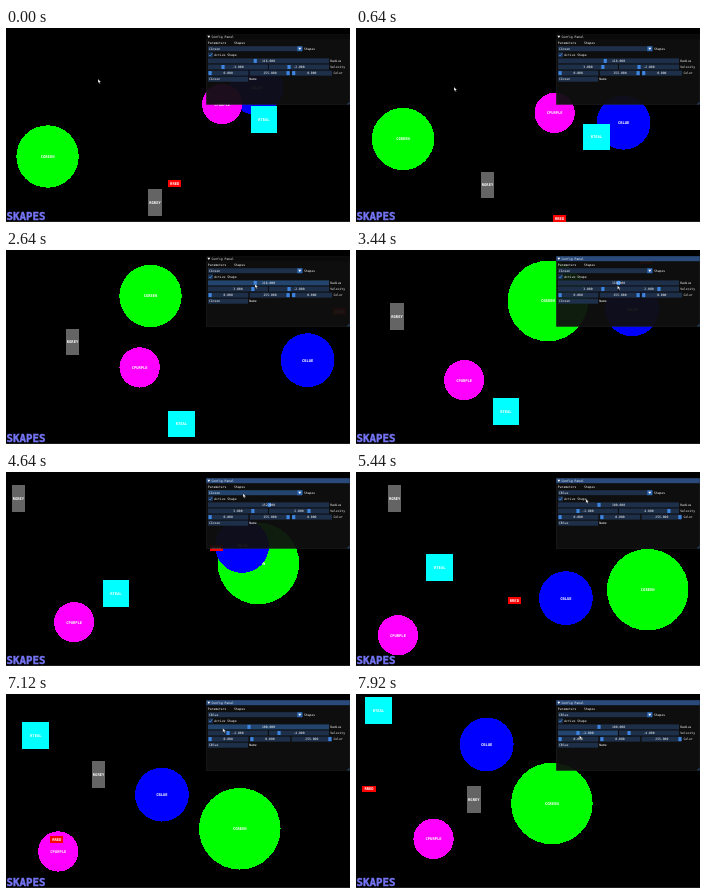
Recreate the animation shown at these times as an HTML page. Size 344 by 194 pixels, loop 8000 ms.

```html
<!DOCTYPE html>
<html lang="en">
<head>
<meta charset="utf-8">
<title>Bouncing shapes</title>
<style>
  html, body { margin: 0; width: 100%; height: 100%; overflow: hidden; background: #000; }
  svg { display: block; width: 100vw; height: 100vh; }
  text { font-family: "DejaVu Sans Mono", monospace; font-size: 3.1px; fill: #fff; white-space: pre; }
  .shape { shape-rendering: crispEdges; }
  .label { font-size: 3.8px; font-weight: bold; text-anchor: middle; }
  .value { text-anchor: middle; }
  .logo { font-size: 10.8px; font-weight: bold; fill: #7474f4; stroke: #7474f4; stroke-width: 0.4; }
</style>
</head>
<body>
<svg id="stage" viewBox="0 0 344 194"></svg>
<script>
const W = 344, H = 194, LOOP = 8000, STEP = 80;
const FRAME = '#1d2f49', HOVER = '#23456d', GRAB = '#3d85e0', ACTIVE = '#4296fa';
const stage = document.getElementById('stage');

// [time, value...] tables, linear between rows
const travel = [[0, 0], [640, 8.75], [1840, 28.5], [3440, 54], [4640, 74], [6240, 100.2], [7920, 126.7]];
const growth = [[2800, 31.2], [3440, 40.3], [3600, 40.8]];
const pointer = [[0, 92, 51], [640, 98, 59], [1840, 241, 84], [2640, 249, 34], [2800, 249, 34],
  [3440, 261.5, 35.5], [3600, 262.5, 35], [4640, 237, 21.5], [5200, 236, 27], [6240, 209.5, 26.5], [7920, 223.5, 41.5]];
const FOCUS = 2720, DRAG_END = 3600, PICK = 5200;

// start corner, velocity, size
const shapes = [
  { name: 'CGreen', fill: '#0f0', x: 10.4, y: 97.3, vx: -3, vy: -2, r: 31.2 },
  { name: 'CBlue', fill: '#00f', x: 223.2, y: 33, vx: 2, vy: 3.98, r: 26.9 },
  { name: 'CPurple', fill: '#f0f', x: 196, y: 56, vx: -2, vy: 1, r: 20.15 },
  { name: 'RRed', fill: '#f00', x: 162, y: 152, vx: 3.99, vy: 3.99, w: 13.4, h: 6.7 },
  { name: 'RGrey', fill: '#646464', x: 142.3, y: 161, vx: -2, vy: -2, w: 13.4, h: 26.9 },
  { name: 'RTeal', fill: '#0ff', x: 244.5, y: 78, vx: -2, vy: 2, w: 26.9, h: 26.9 }
];

function add(tag, attrs, content) {
  const node = document.createElementNS('http://www.w3.org/2000/svg', tag);
  set(node, attrs);
  if (content) node.textContent = content;
  return stage.appendChild(node);
}

function set(node, attrs) {
  for (const key in attrs) node.setAttribute(key, attrs[key]);
}

function sample(table, t) {
  if (t <= table[0][0]) return table[0].slice(1);
  for (let i = 1; i < table.length; i++) {
    const a = table[i - 1], b = table[i];
    if (t <= b[0]) {
      const k = (t - a[0]) / (b[0] - a[0]);
      return a.slice(1).map((v, j) => v + (b[j + 1] - v) * k);
    }
  }
  return table[table.length - 1].slice(1);
}

// position and direction of a point bouncing between 0 and max
function bounce(p, max) {
  const q = ((p % (2 * max)) + 2 * max) % (2 * max);
  return q < max ? [q, 1] : [2 * max - q, -1];
}

const rect = (x, y, width, height, fill) => add('rect', { x, y, width, height, fill });
const text = (x, y, str, cls = '') => add('text', { x, y, class: cls }, str);

rect(0, H - 1, W, 1, '#1c1c1c');
for (const s of shapes) {
  s.node = add(s.r ? 'circle' : 'rect', { fill: s.fill, class: 'shape' });
  s.label = text(0, 0, s.name.toUpperCase(), 'label');
}
text(0.5, 192.2, 'SKAPES', 'logo');

// panel
add('rect', { x: 200.2, y: 6.2, width: 143.6, height: 70.4, fill: '#0f0f0f', 'fill-opacity': 0.94, stroke: '#2b2b31', 'stroke-width': 0.35 });
const titleBar = rect(200.2, 6.2, 143.6, 5, '#0a0a0a');
add('path', { d: 'M201.4 7.8h2.8l-1.4 2.2z', fill: '#fff' });
text(205.5, 9.9, 'Config Panel');
text(201.8, 16.3, 'Parameters');
text(228, 16.3, 'Shapes');

const frames = [];
function frame(x, y, w) {
  const f = { x, y, w, node: rect(x, y, w, 5, FRAME) };
  frames.push(f);
  return f;
}

function slider(x, y, w) {
  const f = frame(x, y, w);
  f.grab = rect(x, y + 0.5, 3.2, 4, GRAB);
  f.value = text(x + w / 2, y + 3.7, '', 'value');
  return f;
}

function setSlider(f, value, min, max) {
  const k = (value - min) / (max - min);
  f.grab.setAttribute('x', f.x + 0.5 + k * (f.w - 4.2));
  f.value.textContent = value.toFixed(3);
}

frame(202, 18.2, 94.4);
rect(291.2, 18.2, 5.2, 5, '#2f65ad');
add('path', { d: 'M292.3 19.8h3l-1.5 2.1z', fill: '#fff' });
const picked = text(203, 21.9, '');
text(298, 21.9, 'Shapes');

frame(202, 24.3, 5);
add('path', { d: 'M203 26.8l1.2 1.3 2-2.8', fill: 'none', stroke: ACTIVE, 'stroke-width': 0.8 });
text(208.2, 28, 'Active Shape');

const radius = slider(202, 30.4, 121);
const speed = [slider(202, 36.5, 59.9), slider(263, 36.5, 60)];
const color = [0, 1, 2].map(i => slider(202 + i * 41.8, 42.6, 40.4));
frame(202, 48.7, 40);
const nameBox = text(203, 52.4, '');
text(324.2, 34.1, 'Radius');
text(324.2, 40.2, 'Velocity');
text(327.4, 46.3, 'Color');
text(243.2, 52.4, 'Name');
add('path', { d: 'M343.6 73.5v2.9h-2.9z', fill: '#24405f' });

const cursor = add('path', {
  d: 'M0 0v4l1-.9.7 1.6.7-.3-.7-1.5h1.3z', fill: '#fff', stroke: '#000', 'stroke-width': 0.25
});

function draw(t) {
  const [u] = sample(travel, t);
  shapes[0].r = sample(growth, t)[0];

  for (const s of shapes) {
    const w = s.r ? 2 * s.r : s.w, h = s.r ? 2 * s.r : s.h;
    const [x, dx] = bounce(s.x + s.vx * u, W - w);
    const [y, dy] = bounce(s.y + s.vy * u, H - h);
    s.now = [s.vx * dx, s.vy * dy];
    set(s.node, s.r ? { cx: x + s.r, cy: y + s.r, r: s.r } : { x, y, width: w, height: h });
    set(s.label, { x: x + w / 2, y: y + h / 2 + 1.4 });
  }

  const blue = t >= PICK;
  const s = shapes[blue ? 1 : 0];
  picked.textContent = nameBox.textContent = s.name;
  setSlider(radius, Math.round(s.r / 0.26875), 0, 300);
  speed.forEach((f, i) => setSlider(f, Math.round(s.now[i]), -5.6, 5.6));
  color.forEach((f, i) => setSlider(f, i === (blue ? 2 : 1) ? 255 : 0, 0, 255));

  const [px, py] = sample(pointer, t);
  const dragging = t >= FOCUS && t < DRAG_END;
  for (const f of frames) {
    const over = px >= f.x && px <= f.x + f.w && py >= f.y && py <= f.y + 5;
    f.node.setAttribute('fill', over ? HOVER : FRAME);
  }
  radius.grab.setAttribute('fill', dragging ? ACTIVE : GRAB);
  titleBar.setAttribute('fill', t >= FOCUS ? '#294a7a' : '#0a0a0a');
  cursor.setAttribute('transform', `translate(${px} ${py})`);
}

const begin = performance.now();
function tick() {
  const t = (performance.now() - begin) % LOOP;
  draw(Math.floor(t / STEP) * STEP);
  requestAnimationFrame(tick);
}
tick();
</script>
</body>
</html>
```
